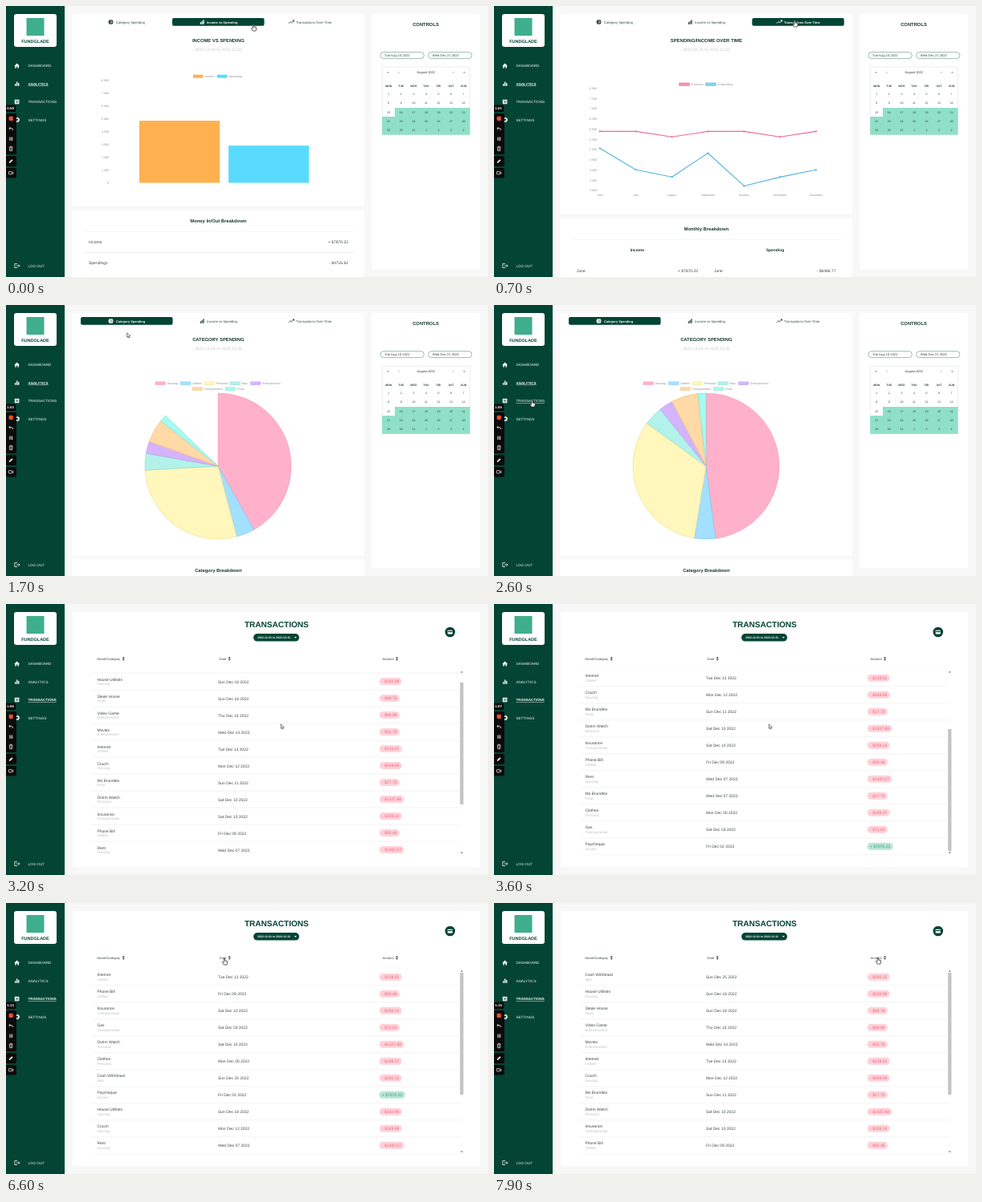
Recreate the animation shown at these times as an HTML page. Size 600 by 338 pixels, loop 8 s.

```html
<!DOCTYPE html>
<html lang="en">
<head>
<meta charset="utf-8">
<title>Budget dashboard</title>
<style>
html, body { margin: 0; width: 100%; height: 100%; overflow: hidden; background: #f8f8f8; }
svg { display: block; width: 600px; height: 338px; font-family: "Liberation Sans", Arial, sans-serif; text-rendering: geometricPrecision; }
text { white-space: pre; }
</style>
</head>
<body>
<svg id="stage" viewBox="0 0 600 338"></svg>
<script>
const LOOP = 8000, CHART_MS = 500;
const GREEN = '#044434', INK = '#16392f', BODY = '#3d4a46', GREY = '#8b8b8b', PALE = '#c4c8c6', MINT = '#7fcfb0';
const BOLD = 'font-weight="700"', MID = 'text-anchor="middle"', END = 'text-anchor="end"';

// y is the middle of the capitals
const text = (x, y, s, size = 5, fill = BODY, more = '') =>
  `<text x="${x}" y="${y + size * 0.36}" font-size="${size}" fill="${fill}" ${more}>${s}</text>`;
const box = (x, y, w, h, fill, rx = 0, more = '') =>
  `<rect x="${x}" y="${y}" width="${w}" height="${h}" rx="${rx}" fill="${fill}" ${more}/>`;
const path = (d, fill, more = '') => `<path d="${d}" fill="${fill}" ${more}/>`;
const stroke = (d, color, w = 0.8) => path(d, 'none', `stroke="${color}" stroke-width="${w}"`);
const rule = (x1, x2, y) => stroke(`M${x1} ${y}H${x2}`, '#ebebeb', 0.6);
const group = (id, body, more = '') => `<g id="${id}" ${more}>${body}</g>`;
const title = (x, y, s) => text(x, y, s, 5.83, INK, `${BOLD} ${MID}`);
const legend = (x, y, w, color, s, edge = color) =>
  box(x, y - 1.8, w, 3.6, color, 0, `stroke="${edge}" stroke-width=".4"`) + text(x + w + 2.4, y, s, 3.6, GREY);
const range = (n, f) => Array.from({ length: n }, (_, i) => f(i));
const thousands = v => v ? `${Math.floor(v / 1000)} ${String(v % 1000).padStart(3, '0')}` : '0';

const rows = [
  'Cash Withdrawl|Misc|25|200.15', 'House Utilities|Housing|18|310.99', 'Steak House|Food|18|48.78',
  'Video Game|Entertainment|15|89.99', 'Movies|Entertainment|14|52.78', 'Internet|Utilities|13|129.51',
  'Couch|Housing|12|549.99', 'Mo Brundles|Food|11|17.75', 'Dorim Watch|Personal|10|1327.88',
  'Insurance|Transportation|10|209.14', 'Phone Bill|Utilities|9|90.46', 'Rent|Housing|7|1400.27',
  'Mo Brundles|Food|7|17.75', 'Clothes|Personal|5|199.27', 'Gas|Transportation|3|71.91',
  'Paycheque|Income|2|7870.22'
].map((line, id) => {
  const [name, cat, day, amount] = line.split('|');
  return { id, name, cat, day: +day, amount };
});

function sidebar() {
  const links = [['DASHBOARD', 74.5], ['ANALYTICS', 97], ['TRANSACTIONS', 119.5], ['SETTINGS', 142], ['LOG OUT', 324]];
  const W = '#f3f8f5';
  return box(0, 0, 73, 338, GREEN)
    + box(10, 10, 53, 41, '#fff', 3)
    + box(25.5, 15, 22, 22, '#3fae8c')
    + text(36.5, 44.5, 'FUNDGLADE', 5.5, GREEN, `${BOLD} ${MID}`)
    + links.map(([s, y], i) => text(27.5, y, s, 4.55, W, `id="link${i}"`)).join('')
    + path('M10.3 74.8L13.6 71.5L17 74.8H16V77.5H14.4V75.4H12.8V77.5H11.2V74.8Z', W)
    + path('M11 97H12.4V99.7H11ZM13 94.5H14.4V99.7H13ZM15 96H16.4V99.7H15Z', W)
    + box(10.8, 116.7, 5.6, 5.6, W, 0.5) + stroke('M12 118.3H15.4M12 119.5H15.4M12 120.7H15.4', GREEN, 0.5)
    + `<circle cx="14" cy="142" r="1.9" fill="none" stroke="${W}" stroke-width="1.5"/>`
    + `<circle cx="14" cy="142" r="2.7" fill="none" stroke="${W}" stroke-width=".8" stroke-dasharray="1.1 1.02"/>`
    + stroke('M14 321.5H10.8V326.5H14M12.8 324H17M15.5 322.4L17 324L15.5 325.6', W, 0.8);
}

function recorder() {
  const B = '#0b0b0b', W = '#f2f2f2';
  return box(-3, 123.5, 15.2, 8.6, B, 1.5) + text(5.6, 127.8, '', 4.3, '#fff', `${BOLD} ${MID} id="clock"`)
    + box(-3, 134, 16, 51, B, 2) + box(3.6, 137.8, 5.2, 5.2, '#ee4b2e', 1)
    + stroke('M5.3 151L3.9 152.6L5.4 154M4 152.6H7Q8.7 152.8 8.7 155', W)
    + stroke('M5 163.4V168M7.4 163.4V168', W, 1.1)
    + stroke('M3.8 176.2H8.6M5.3 176V175.2H7.1V176M4.4 176.5L4.7 180.6H7.7L8 176.5M6.2 177.4V179.8', W, 0.7)
    + box(-3, 187, 16, 13, B, 2) + path('M3.8 196L4.2 194.3L7.2 191.3L8.5 192.6L5.5 195.6Z', W)
    + box(-3, 202, 16, 12.5, B, 2) + box(3.5, 206.4, 3.6, 3.6, 'none', 0.6, `stroke="${W}" stroke-width=".7"`)
    + stroke('M7.2 208L8.9 206.8V209.7L7.2 208.5', W, 0.6);
}

const tabs = [
  { x: 93, tx: 137, s: 'Category Spending',
    icon: '<circle cx="130.5" cy="20" r="3" fill="currentColor"/><path d="M130.7 16.8V23.2M130.7 20H133.6" stroke="#fff" stroke-width=".5" id="cut"/>' },
  { x: 207, tx: 250, s: 'Income vs Spending', icon: path('M241.7 20.3H243V22.7H241.7ZM243.5 18.7H244.8V22.7H243.5ZM245.3 17.2H246.6V22.7H245.3Z', 'currentColor') },
  { x: 321.3, tx: 361, s: 'Transactions Over Time', icon: stroke('M351.8 21.8L354 19.5L355.6 21L358.3 18M356.6 17.8H358.5V19.7', 'currentColor', 0.9) }
];

function controls() {
  const col = i => 476.3 + 15.55 * i;
  const pill = (x, s) => box(x, 57.6, 54.3, 8, '#fff', 4, 'stroke="#5f8f80" stroke-width=".6"') + text(x + 5.2, 61.6, s, 4.15, BODY);
  const days = range(35, i => text(col(i % 7), 109.6 + 11.35 * Math.floor(i / 7), i % 31 + 1, 3.6, '#303c38', MID)).join('');
  return box(455, 10, 135, 318, '#fff', 2) + title(522.5, 23, 'CONTROLS')
    + pill(466, 'Tue Aug 16 2022') + pill(525.6, 'Wed Dec 21 2022')
    + box(468.2, 76, 109.3, 84.7, '#fff', 0, 'stroke="#dcdcdc" stroke-width=".5"')
    + box(484, 127, 93.5, 11.3, '#90e0c8') + box(468.2, 138, 109.3, 22.7, '#90e0c8')
    + [['«', 475.5], ['‹', 489], ['›', 557], ['»', 570.5]].map(([s, x]) => text(x, 82, s, 4.4, '#333', MID)).join('')
    + text(522.8, 82.6, 'August 2022', 4, '#333', MID)
    + 'MON TUE WED THU FRI SAT SUN'.split(' ').map((d, i) => text(col(i), 99.5, d, 3.5, '#2f4a41', `${BOLD} ${MID}`)).join('')
    + days;
}

// One analytics tab: top card with heading, lower card below it
const view = (id, bottom, head, dates, lower, body) => group(id,
  box(82, 10, 364, bottom - 10, '#fff', 2) + box(82, bottom + 4, 364, 338, '#fff', 2)
  + title(264.3, 43.3, head) + text(264.5, 54.3, dates, 5.1, PALE, MID)
  + title(264.3, bottom + 17.8, lower) + body);

function barView() {
  const axis = range(9, i => text(128, 92.5 + 16 * i, thousands(8000 - 1000 * i), 3.6, GREY, END)).join('');
  return view('view1', 250, 'INCOME VS SPENDING', '2022-12-01 to 2022-12-31', 'Money In/Out Breakdown',
    legend(233, 87.7, 12, '#ffb150', 'Income') + legend(263, 87.7, 12, '#59dbff', 'Spendings') + axis
    + box(166, 0, 100, 0, '#ffb150', 0, 'id="bar0"') + box(277, 0, 100, 0, '#59dbff', 0, 'id="bar1"')
    + rule(96, 433, 281.3) + text(103, 294, 'Income') + text(426, 294, '+ $7870.22', 5, BODY, END)
    + rule(96, 433, 307.5) + text(103, 320, 'Spendings') + text(426, 320, '- $4716.62', 5, BODY, END));
}

const lineX = i => 131.8 + 44.85 * i;
const lines = [
  { color: '#ee6a94', y: [106.2, 106.2, 117.8, 106.2, 106.2, 117.8, 106.2] },
  { color: '#4fb6dc', y: [141.6, 186.8, 201.7, 151.8, 220.6, 202, 186.8] }
];

function lineView() {
  const axis = range(11, i => text(128, 102.5 + 12.76 * i, thousands(8000 - 500 * i), 3.6, GREY, END)).join('');
  const months = 'June July August September October November December'.split(' ')
    .map((m, i) => text(lineX(i), 236, m, 3.6, GREY, MID)).join('');
  return view('view2', 260, 'SPENDING/INCOME OVER TIME', '2022-05-31 to 2022-12-31', 'Monthly Breakdown',
    legend(230.4, 97.7, 13, '#f890ae', '$ Income', '#ee6a94') + legend(263.4, 97.7, 13, '#85d0ee', '$ Spending', '#4fb6dc')
    + axis + months + lines.map((l, i) => path('', 'none', `id="line${i}" stroke="${l.color}" stroke-width="1.1" stroke-linejoin="round"`)
      + path('', l.color, `id="dots${i}"`)).join('')
    + rule(96, 433, 291.3)
    + text(178.3, 304, 'Income', 4.95, INK, `${BOLD} ${MID}`) + text(350, 304, 'Spending', 4.95, INK, `${BOLD} ${MID}`)
    + text(103, 330, 'June') + text(254, 330, '+ $7870.22', 5, BODY, END)
    + text(274, 330, 'June') + text(425.5, 330, '- $6486.77', 5, BODY, END));
}

const slices = [
  ['Housing', '#ffb1cb', '#f58bab', 186, 97.7], ['Utilities', '#a3dfff', '#6fbfe8', 217.5, 97.7],
  ['Personal', '#fff7bb', '#e5d77e', 247, 97.7], ['Misc', '#b2f2ea', '#7fd0c4', 279, 97.7],
  ['Entertainment', '#d5b4ff', '#b58ae8', 304.5, 97.7], ['Transportation', '#ffd9a6', '#efb56e', 232, 104.6],
  ['Food', '#a4fbf0', '#70d8cb', 273.3, 104.6]
].map(([name, fill, edge, x, y]) => ({
  name, fill, edge, x, y, sum: rows.filter(r => r.cat === name).reduce((s, r) => s + +r.amount, 0)
}));
const spent = slices.reduce((s, c) => s + c.sum, 0);

function pieView() {
  return view('view0', 313, 'CATEGORY SPENDING', '2022-12-01 to 2022-12-31', 'Category Breakdown',
    slices.map((c, i) => legend(c.x, c.y, 12.3, c.fill, c.name, c.edge)
      + path('', c.fill, `id="slice${i}" stroke="${c.edge}" stroke-width=".5"`)).join(''));
}

function rowMarkup(r) {
  const gain = r.cat === 'Income';
  const em = (gain ? 0.584 : 0.333) + 1.112 + 0.556 * (r.amount.length - 1);
  const week = ['Wed', 'Thu', 'Fri', 'Sat', 'Sun', 'Mon', 'Tue'][r.day % 7];
  return group('row' + r.id, text(113.4, -2.7, r.name, 4.95) + text(113.4, 2.9, r.cat, 4.4, '#bcc0be')
    + text(264, 0.3, `${week} Dec ${String(r.day).padStart(2, '0')} 2022`, 4.95)
    + box(464.6, -4.4, em * 5 + 7, 9, gain ? '#b9e6d6' : '#ffd2d9', 4.5)
    + text(468.1, 0.2, `${gain ? '+' : '-'} $${r.amount}`, 5, gain ? '#349c78' : '#ee5d77')
    + rule(106, 565, 10.6));
}

function tablePage() {
  const head = (x, s, ix) => text(x, 68.3, s, 4.15)
    + path(`M${ix - 1.6} 67.8L${ix} 65.8L${ix + 1.6} 67.8ZM${ix - 1.6} 68.8L${ix} 70.8L${ix + 1.6} 68.8Z`, '#2f3a36');
  return group('table', box(83, 10, 507, 318, '#fff', 2)
    + text(336.8, 25.5, 'TRANSACTIONS', 10.05, GREEN, `${BOLD} ${MID}`)
    + box(308, 37, 57, 9.6, GREEN, 4.8) + text(333.5, 41.8, '2022-12-01 to 2022-12-31', 3.5, '#fff', `${BOLD} ${MID}`)
    + path('M358.8 41L361.8 41L360.3 42.8Z', '#fff')
    + `<circle cx="552.8" cy="35" r="6.3" fill="${GREEN}"/>` + box(549.7, 32.7, 6.2, 4.7, '#fff', 0.6) + box(549.7, 33.9, 6.2, 1.2, GREEN)
    + head(113.2, 'Name/Category', 146.2) + head(265.5, 'Date', 278.1) + head(468.5, 'Amount', 486.6)
    + `<g clip-path="url(#list)">${rows.map(rowMarkup).join('')}</g>`
    + path('M565.8 85.6L567.3 83.8L568.8 85.6ZM565.8 309.4L567.3 311.2L568.8 309.4Z', '#666')
    + box(565.2, 87, 4.2, 152, '#c3c3c3', 0, 'id="thumb"'));
}

const stage = document.getElementById('stage');
stage.innerHTML = '<defs><clipPath id="list"><rect x="100" y="81.8" width="465" height="231.4"/></clipPath></defs>'
  + box(0, 0, 600, 338, '#f8f8f8') + sidebar()
  + group('analytics', pieView() + barView() + lineView() + controls()
    + tabs.map((t, i) => group('tab' + i, box(t.x, 15, 114.5, 9.8, GREEN, 2) + t.icon + text(t.tx, 20, t.s, 4.2, 'currentColor'))).join(''))
  + tablePage() + recorder()
  + group('hand', path('M-1.3 -4Q-.5 -4.6 0 -3.7V-1.3L2.4 -.8Q3.3 -.5 3.2 .6L2.6 4H-1.3L-3 1.3Q-3.2 .3 -2.3 .4L-1.3 1.2Z', '#fff', 'stroke="#222" stroke-width=".7" stroke-linejoin="round"')
    + stroke('M.8 -1V.8M2 -.7V.8', '#222', 0.35))
  + group('arrow', path('M-1.3 -3.2V2.3L0 1.2L.9 3.1L1.8 2.7L1 .8H2.7Z', '#fff', 'stroke="#222" stroke-width=".6" stroke-linejoin="round"'));

const $ = Object.fromEntries([...stage.querySelectorAll('[id]')].map(el => [el.id, el]));
const set = (id, attrs) => { for (const k in attrs) $[id].setAttribute(k, attrs[k]); };
const show = (id, on) => { $[id].style.display = on ? '' : 'none'; };

// Schedules: time first
const tabTimes = [[0, 1, -105], [600, 2, 600], [1500, 0, 1500]];
const TABLE_AT = 2700;
const sortTimes = [[0, 'day', -1], [4700, 'cat', 1], [5400, 'cat', -1], [6700, 'day', 1], [7000, 'day', -1]];
const scrollKeys = [[0, 0], [3100, 0], [3500, 105], [3700, 105], [4150, 0], [LOOP, 0]];
// time, x, y, hand shown until the next step
const cursorKeys = [
  [0, 308.5, 27, 1], [400, 375, 22, 1], [750, 375, 22, 1], [1250, 160.5, 25, 1], [1550, 160.5, 25, 1],
  [1700, 152, 38, 0], [2350, 49, 119, 1], [2500, 48, 123, 1], [2750, 48, 123, 0], [3100, 343.5, 153, 0],
  [3900, 343.5, 153, 0], [4400, 131, 74, 1], [4500, 129.5, 73, 1], [5700, 129.5, 73, 0], [6300, 272.5, 73, 1],
  [7200, 272.5, 73, 0], [7700, 478.5, 72, 1], [LOOP, 478.5, 72, 1]
];

const current = (steps, t) => steps.filter(s => s[0] <= t).pop();
const smooth = p => p * p * (3 - 2 * p);
const easeOut = p => 1 - (1 - Math.min(1, Math.max(0, p))) ** 4;

function at(keys, t) {
  const i = keys.findIndex(k => k[0] > t), a = keys[i - 1], b = keys[i];
  const p = smooth((t - a[0]) / (b[0] - a[0]));
  return a.map((v, n) => v + (b[n] - v) * p);
}

function drawBars(p) {
  [7870.22, 4716.62].forEach((v, i) => {
    const h = v * 0.016 * p;
    set('bar' + i, { y: 220.5 - h, height: h });
  });
}

function drawLines(p) {
  lines.forEach((l, i) => {
    const pts = l.y.map((y, n) => [lineX(n), 230 + (y - 230) * p]);
    set('line' + i, { d: 'M' + pts.map(q => q.join(' ')).join('L') });
    set('dots' + i, { d: pts.map(([x, y]) => `M${x - 1.1} ${y}a1.1 1.1 0 1 0 2.2 0a1.1 1.1 0 1 0 -2.2 0`).join('') });
  });
}

function drawPie(p) {
  const rim = a => `${264 + 91 * Math.sin(a)} ${201 - 91 * Math.cos(a)}`;
  let a = 0;
  slices.forEach((c, i) => {
    const sweep = c.sum / spent * Math.PI * 2 * p;
    set('slice' + i, { d: `M264 201L${rim(a)}A91 91 0 ${sweep > Math.PI ? 1 : 0} 1 ${rim(a + sweep)}Z` });
    a += sweep;
  });
}

const charts = [drawPie, drawBars, drawLines];

function drawAnalytics(t, x, y) {
  const [, active, began] = current(tabTimes, t);
  tabs.forEach((tab, i) => {
    const on = i === active, hover = y > 14 && y < 26 && x > tab.x && x < tab.x + 114;
    show('view' + i, on);
    const g = $['tab' + i], label = g.querySelector('text');
    g.style.color = on ? '#fff' : hover ? MINT : '#2f4a41';
    g.querySelector('rect').style.display = on ? '' : 'none';
    label.setAttribute('font-weight', on ? 700 : 400);
    label.setAttribute('font-size', on ? 3.95 : 4.2);
  });
  set('cut', { stroke: active === 0 ? GREEN : '#fff' });
  charts[active](easeOut((t - began) / CHART_MS));
}

function drawTable(t) {
  const [, key, dir] = current(sortTimes, t), scroll = at(scrollKeys, t)[1];
  const order = [...rows].sort((a, b) => dir * (a[key] > b[key] ? 1 : a[key] < b[key] ? -1 : 0));
  order.forEach((r, i) => set('row' + r.id, { transform: `translate(0 ${92.2 + 21 * i - scroll})` }));
  set('thumb', { y: 87 + scroll * 69 / 105 });
}

function draw() {
  const t = performance.now() % LOOP, onTable = t >= TABLE_AT;
  const [, x, y] = at(cursorKeys, t), hand = current(cursorKeys, t)[3];
  show('analytics', !onTable);
  show('table', onTable);
  if (onTable) drawTable(t); else drawAnalytics(t, x, y);

  [1, 2].forEach(i => {
    const on = (i === 2) === onTable;
    const hover = x > 27 && x < 64 && Math.abs(y - 74.5 - 22.5 * i) < 5;
    set('link' + i, {
      'font-weight': on ? 700 : 400, 'font-size': on ? 4.45 : 4.55,
      'text-decoration': on || hover ? 'underline' : 'none'
    });
  });

  const secs = Math.floor(59.85 + t / 500);
  $.clock.textContent = `${Math.floor(secs / 60)}:${String(secs % 60).padStart(2, '0')}`;
  show('hand', hand);
  show('arrow', !hand);
  set(hand ? 'hand' : 'arrow', { transform: `translate(${x} ${y})` });
  requestAnimationFrame(draw);
}
draw();
</script>
</body>
</html>
```
